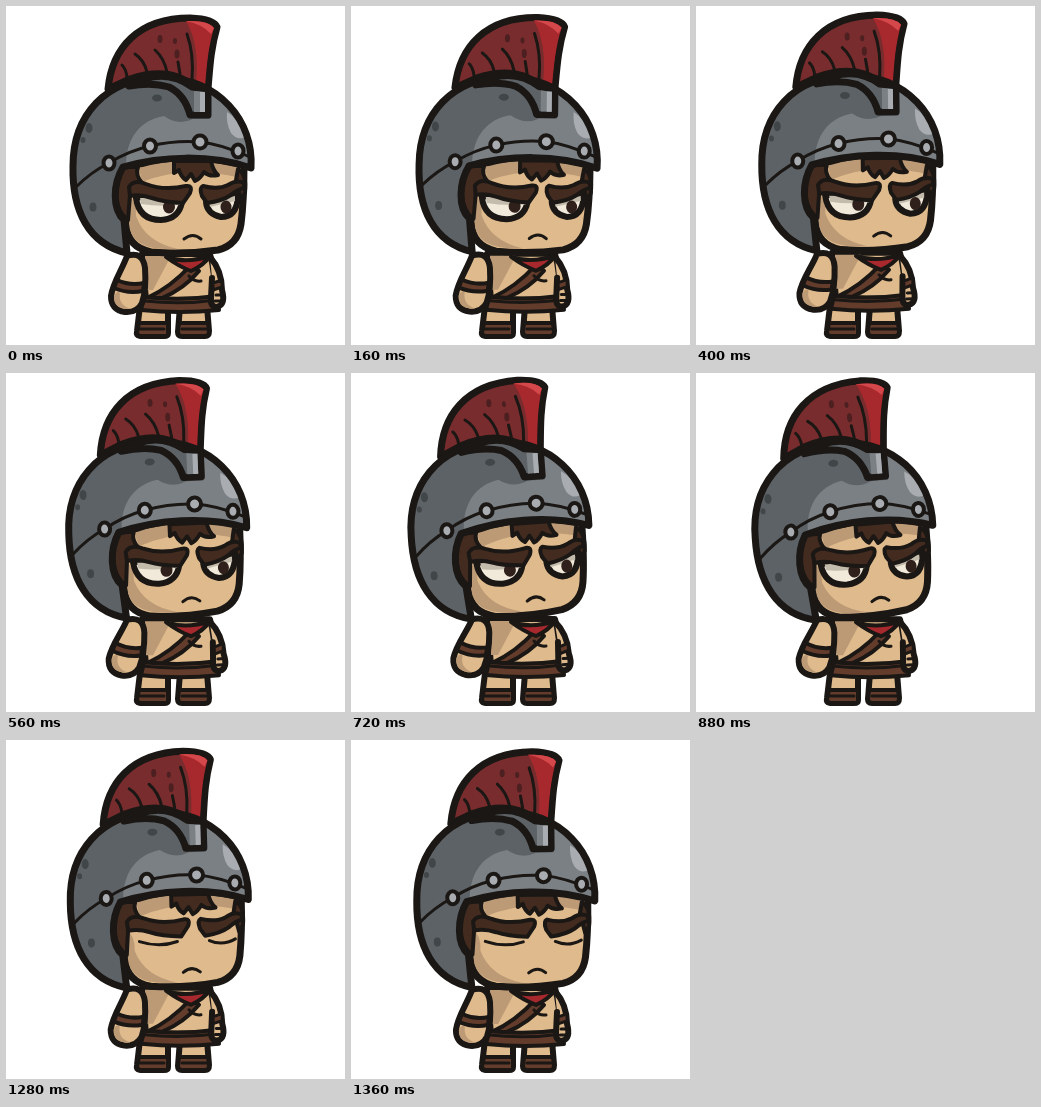
An HTML page for the animation above (1.44 s loop, 339x339 px).

```html
<!DOCTYPE html>
<html>
<head>
<meta charset="utf-8">
<style>
  html, body { margin: 0; height: 100%; overflow: hidden; background: #fff; }
  svg { display: block; width: 100vw; height: 100vh; }
  .o { stroke: #1a1714; stroke-width: 7; stroke-linejoin: round; stroke-linecap: round; }
  .b { stroke-width: 6; }
  .m { stroke-width: 4; }
  .t { stroke-width: 3; }
  .n { fill: none; }
  .skin { fill: #dfba8c; }
  .tan { fill: #bd9a76; }
  .leather { fill: #633c2c; }
  .hair { fill: #432b20; }
  .steel { fill: #5d6266; }
  .light { fill: #7b8085; }
  .shine { fill: #a9adb1; }
  .dent { fill: #414649; }
  .red { fill: #a8292d; }
  .wine { fill: #792c2d; }
  .white { fill: #f1eadb; }
  .shade { fill: #c3bbab; }
</style>
</head>
<body>
<svg viewBox="0 0 339 339">
  <g id="legs">
    <path class="o b skin" d="M134 300H162V327Q162 330 158 330H134Q130 330 131 325Z"/>
    <path class="o b skin" d="M174 300H201L203 325Q203 330 199 330H176Q172 330 172 326Z"/>
    <path class="o m leather" d="M133 317H162V328Q162 330 158 330H135Q131 330 131 326ZM173 317H202L203 326Q203 330 199 330H176Q172 330 172 326Z"/>
    <path class="o t n" d="M134 323H158M176 323H200"/>
  </g>

  <g id="torso">
    <path class="o b skin" d="M136 248H204C208 262 209 276 209 294H140Z"/>
    <path class="tan" d="M139 250H165L147 284H140Z"/>
    <path class="o m leather" d="M184 260L193 265Q178 283 156 292H141Q165 281 184 260Z"/>
    <path class="o t n" d="M183 270Q188 276 195 275"/>
    <path class="o m red" d="M160 251Q180 258 204 250Q197 260 185 265Q172 260 160 251Z"/>
    <path class="o m leather" d="M138 291Q175 295 211 290L213 304Q174 308 135 304Z"/>
    <path class="o t n" d="M139 295Q175 299 211 294"/>
  </g>

  <g id="armR">
    <path class="o b skin" d="M204 251C211 259 216 270 216 284Q220 299 211 301Q204 301 205 292L206 272"/>
    <path class="o t leather" d="M207 277L216 274V281L207 284Z"/>
    <path class="o t n" d="M210 289H216M209 295H215"/>
  </g>

  <g id="armL">
    <path class="o b skin" d="M121 250Q137 245 139 262C140 276 139 288 136 297Q131 307 119 306Q105 304 105 290C107 276 116 264 121 250"/>
    <path class="tan" d="M108 290Q111 284 114 287Q112 299 125 303Q107 304 108 290Z"/>
    <path class="o m leather" d="M111 274Q124 280 138 277L137 285Q122 288 108 282Z"/>
  </g>

  <g id="head">
    <path class="o skin" d="M112 158H238C238 180 238 195 235 218Q232 239 212 244Q178 249 145 246Q121 241 120 218Z"/>
    <path class="tan" d="M123 190Q131 195 130 210Q139 236 172 243Q124 246 123 217Z"/>
    <path class="tan" d="M133 162Q180 148 235 162V172Q180 158 136 176Z"/>
    <path class="o m hair" d="M112 161L132 161Q129 169 136 177L124 189L122 214Q109 205 110 180Z"/>
    <path class="o m hair" d="M232 163Q241 168 239 187L235 194L230 174Z"/>
    <path class="o m hair" d="M168 155H205Q207 165 212 169Q203 171 198 166Q194 173 189 175L185 168L180 174Q175 171 173 164L168 167Z"/>

    <g id="open">
      <path class="o b white" d="M130 192Q133 214 155 214Q173 213 176 196L150 188Z"/>
      <path class="o b white" d="M232 190Q231 211 215 211Q201 208 200 196L220 187Z"/>
      <path class="shade" d="M134 192H174V199Q152 201 135 198ZM203 195L229 190V195L204 201Z"/>
      <g fill="#30201b">
        <ellipse cx="163" cy="201" rx="6" ry="6.5"/>
        <ellipse cx="220" cy="201" rx="5.5" ry="6.5"/>
      </g>
    </g>
    <path id="shut" class="o t n" d="M135 201Q155 208 173 202M205 202Q218 208 231 201"/>

    <path class="o m hair" d="M123 181Q128 173 140 178Q158 185 180 180Q187 179 184 187L177 197Q157 196 146 192Q134 188 124 190Z"/>
    <path class="o m hair" d="M238 177Q231 173 222 179Q212 184 197 180Q193 182 196 190L201 197Q216 195 225 189Q232 183 238 182Z"/>
    <path class="o t n" d="M178 233Q187 226 195 233"/>

    <path class="o wine" d="M102 83C106 42 132 12 184 12Q208 13 211 21C205 42 204 58 202 83L187 80Q163 60 124 73Z"/>
    <path class="red" d="M180 15Q202 14 208 22C202 42 201 58 199 80L190 78Q194 38 180 15Z"/>
    <path fill="#d4474a" d="M180 15Q202 14 208 22L205 28Q196 18 180 15Z"/>
    <path class="o t n" d="M116 59Q120 63 121 71M129 48Q138 54 141 66M149 44Q158 52 161 66M181 28Q188 48 186 73M172 56L174 68"/>
    <g fill="#4c1f20">
      <ellipse cx="154" cy="33" rx="2.5" ry="4"/>
      <ellipse cx="169" cy="35" rx="2" ry="3"/>
      <ellipse cx="171" cy="48" rx="2.5" ry="4.5"/>
    </g>

    <path class="steel" id="shell" d="M245 162C248 115 213 72 155 72C99 72 67 110 67 160C66 204 82 238 121 247L118 214C106 203 107 178 117 161C155 150 205 148 245 162Z"/>
    <path class="light" d="M120 157C121 132 134 114 158 110Q172 120 187 113H204Q206 99 202 87Q242 104 244 159C205 147 160 148 120 157Z"/>
    <path class="shine" d="M221 106Q233 113 240 131Q231 135 225 127Q220 118 221 106Z"/>
    <g class="dent">
      <ellipse cx="151" cy="92" rx="5" ry="3.5"/>
      <ellipse cx="83" cy="122" rx="3.5" ry="5"/>
      <ellipse cx="77" cy="134" rx="2.5" ry="3"/>
      <ellipse cx="87" cy="201" rx="3.5" ry="4.5"/>
    </g>
    <path class="o t n" d="M70 181Q85 166 103 157Q122 145 144 140Q170 134 194 136Q215 138 244 151"/>
    <use href="#shell" class="o" style="fill-opacity:0"/>
    <path class="o steel" d="M123 80Q158 60 186 81L202 83V109H184Q179 89 163 81Q146 76 123 80Z"/>
    <path class="light" d="M188 85L199 86V106H188Z"/>
    <path class="shine" d="M194 86H199V106H194Z"/>
    <g class="o m shine">
      <ellipse cx="103" cy="157" rx="5.5" ry="6.5"/>
      <ellipse cx="144" cy="140" rx="6" ry="6.5"/>
      <ellipse cx="194" cy="136" rx="6.5" ry="6.5"/>
      <ellipse cx="232" cy="145" rx="5.5" ry="6.5"/>
    </g>
  </g>
</svg>
<script>
  const PERIOD = 1440, STEP = 80, LOOKAHEAD = 8;
  const $ = id => document.getElementById(id);
  const wave = t => Math.cos(2 * Math.PI * t / PERIOD);
  const pose = (id, y, angle, px, py) =>
    $(id).setAttribute('transform', `translate(0 ${y}) rotate(${angle} ${px} ${py})`);

  function draw() {
    // Look half a display frame ahead so a step never shows late.
    const now = performance.now() + LOOKAHEAD;
    const t = Math.floor(now % PERIOD / STEP) * STEP;
    const lift = (1 - wave(t)) / 2;
    const sway = 2.7 * (wave(t - 160) - wave(160));
    pose('head', -4.8 * lift, sway, 175, 258);
    pose('torso', -2 * lift, 0, 175, 290);
    pose('armL', -3 * lift, 4 * lift, 132, 252);
    pose('armR', -3 * lift, -4 * lift, 205, 258);
    const blink = t >= 1040;
    $('open').style.display = blink ? 'none' : '';
    $('shut').style.display = blink ? '' : 'none';
    requestAnimationFrame(draw);
  }
  draw();
</script>
</body>
</html>
```
